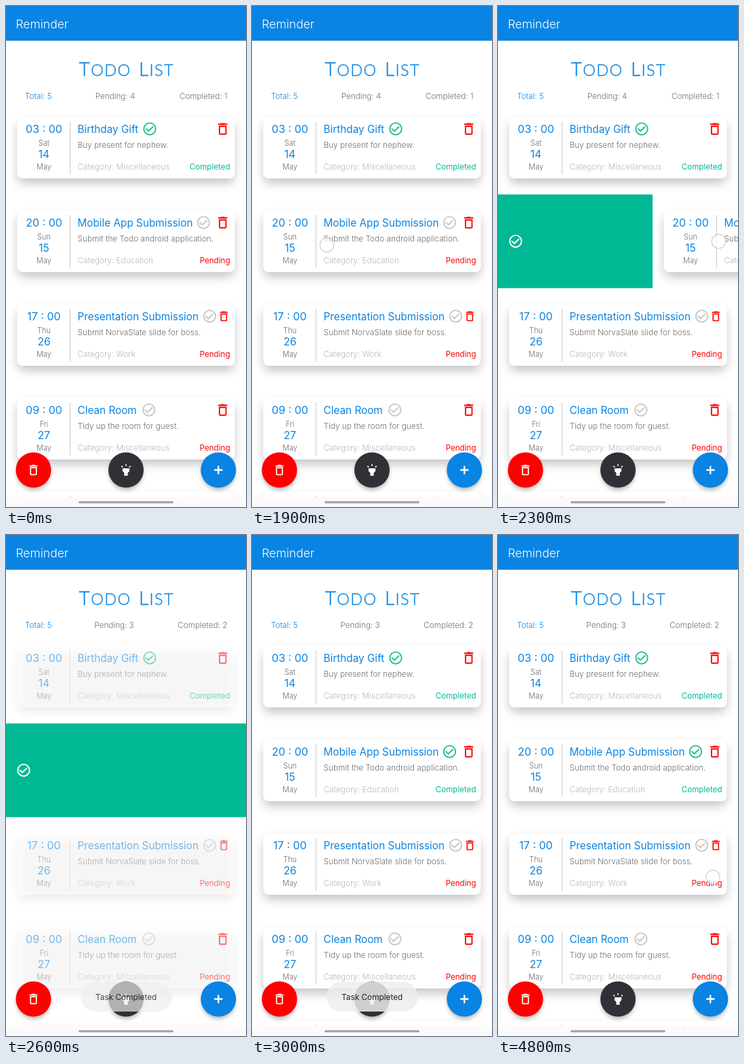
An HTML page for the animation above (4900 ms loop, 354x738 px).

```html
<!DOCTYPE html>
<html lang="en">
<head>
<meta charset="utf-8">
<title>Reminder</title>
<style>
  html, body { margin: 0; width: 100%; height: 100%; overflow: hidden; background: #fff; }
  svg { display: block; width: 100vw; height: 100vh; }
  text { font-family: Inter, Roboto, sans-serif; font-weight: 300; font-size: 11.8px; fill: #6f6f6f; white-space: pre; }
  .mid { text-anchor: middle; }
  .end { text-anchor: end; }
  .blue { fill: #0984e3; }
  .bar { font-size: 17.5px; fill: #fff; }
  .head { font-family: Lato, "Open Sans", sans-serif; font-size: 28px; letter-spacing: 1.4px; fill: #0984e3; stroke: #0984e3; stroke-width: 0.35px; }
  .head .cap { font-size: 23.5px; }
  .stat { font-size: 11.7px; }
  .time { font-size: 16px; font-weight: 400; }
  .day { font-size: 11px; }
  .date { font-size: 15.6px; font-weight: 400; }
  .name { font-size: 15.3px; font-weight: 400; }
  .pale { fill: #b8b8b8; }
  .state { font-size: 11.6px; font-weight: 400; }
  .toast { fill: #222; font-weight: 400; font-size: 11.8px; }
</style>
</head>
<body>
<svg id="stage" viewBox="0 0 354 738" xmlns="http://www.w3.org/2000/svg">
  <defs>
    <filter id="soft" x="-20%" y="-50%" width="140%" height="200%"><feGaussianBlur stdDeviation="7.5"/></filter>
    <filter id="near" x="-30%" y="-30%" width="160%" height="160%"><feGaussianBlur stdDeviation="3"/></filter>
    <path id="trash" fill-rule="evenodd" d="M6 19c0 1.1.9 2 2 2h8c1.1 0 2-.9 2-2V7H6zM8 9h8v10H8zM15.5 4l-1-1h-5l-1 1H5v2h14V4z"/>
    <path id="check" fill-rule="evenodd" d="M16.59 7.58L10 14.17l-3.59-3.58L5 12l5 5 8-8zM12 2C6.48 2 2 6.48 2 12s4.48 10 10 10 10-4.48 10-10S17.52 2 12 2zm0 18c-4.42 0-8-3.58-8-8s3.58-8 8-8 8 3.58 8 8-3.58 8-8 8z"/>
    <path id="torch" d="M6 14l3 3v5h6v-5l3-3V9H6zM11 2h2v3h-2zM3.5 5.88l1.41-1.41 2.12 2.12L5.62 8zM16.96 6.59l2.12-2.12 1.41 1.41L18.38 8z"/>
    <path id="plus" d="M10.7 5h2.6v5.7H19v2.6h-5.7V19h-2.6v-5.7H5v-2.6h5.7z"/>
  </defs>
</svg>
<script>
const LOOP = 4900, STEP = 100, ROW = 138;
const BLUE = '#0984e3', GREEN = '#00b894', RED = '#ff0000', GREY = '#c8c8c8';
const stage = document.getElementById('stage');

function el(tag, attrs, parent = stage, content) {
  const node = document.createElementNS('http://www.w3.org/2000/svg', tag);
  for (const key in attrs) node.setAttribute(key, attrs[key]);
  if (content) node.textContent = content;
  return parent.appendChild(node);
}
const label = (x, y, cls, content, parent) => el('text', { x, y, class: cls }, parent, content);
const set = (node, key, value) => node.setAttribute(key, value);
const show = (node, on) => set(node, 'visibility', on ? 'visible' : 'hidden');
const clamp = v => Math.min(1, Math.max(0, v));
const ramp = (t, from, to) => clamp((t - from) / (to - from));

function icon(id, cx, cy, size, fill, parent) {
  const k = size / 24;
  return el('use', {
    href: '#' + id, fill,
    transform: `translate(${cx - size / 2} ${cy - size / 2}) scale(${k})`
  }, parent);
}

function card(task, index) {
  const root = el('g', {}, list);
  const shadow = el('rect', { x: 17, y: 172, width: 320, height: 89, rx: 9, fill: '#000', filter: 'url(#soft)' }, root);
  const face = el('rect', { x: 16.5, y: 163.5, width: 321, height: 90.5, rx: 8, fill: '#fff' }, root);
  const ink = el('g', {}, root);
  label(56, 186.5, 'mid blue time', task.time, ink);
  label(56, 205.5, 'mid day', task.day, ink);
  label(56, 224.3, 'mid blue date', task.date, ink);
  label(56, 240.5, 'mid day', 'May', ink);
  el('rect', { x: 94, y: 170, width: 1, height: 78, fill: '#ccc' }, ink);
  label(105.5, 186.5, 'blue name', task.name, ink);
  label(105.5, 209, '', task.note, ink);
  label(105.5, 240.7, 'pale', 'Category: ' + task.kind, ink);
  const status = label(330.5, 240.7, 'end state', 'Pending', ink);
  const mark = icon('check', task.mark, 181, 23, GREY, ink);
  icon('trash', task.small ? 321.3 : 319.7, 181, task.small ? 19.5 : 23, RED, ink);

  return {
    update(dx, alpha, done) {
      set(root, 'transform', `translate(${dx} ${index * ROW})`);
      set(shadow, 'opacity', 0.23 * alpha * alpha);
      set(face, 'opacity', alpha);
      set(ink, 'opacity', alpha);
      set(mark, 'fill', done ? '#22bd97' : GREY);
      status.textContent = done ? 'Completed' : 'Pending';
      status.style.fill = done ? GREEN : RED;
    }
  };
}

function fab(cx, fill, id, size) {
  el('circle', { cx, cy: 687.5, r: 25, opacity: 0.3, filter: 'url(#near)' });
  el('circle', { cx, cy: 683.5, r: 26, fill });
  icon(id, cx, 683.5, size, '#fff');
}

// Static page
el('rect', { width: 354, height: 51.2, fill: BLUE });
label(14.5, 32.5, 'bar', 'Reminder');
for (const [x, first, rest] of [[107.5, 'T', 'ODO'], [196, 'L', 'IST']]) {
  const word = label(x, 103, 'head', first);
  el('tspan', { class: 'cap' }, word, rest);
}
label(28, 136.5, 'blue stat', 'Total: 5');
const pending = label(161, 136.5, 'mid stat', 'Pending: 4');
const completed = label(326.5, 136.5, 'end stat', 'Completed: 1');

const list = el('g', {});
const cards = [
  { time: '03 : 00', day: 'Sat', date: '14', name: 'Birthday Gift', note: 'Buy present for nephew.', kind: 'Miscellaneous', mark: 212 },
  { time: '17 : 00', day: 'Thu', date: '26', name: 'Presentation Submission', note: 'Submit NorvaSlate slide for boss.', kind: 'Work', mark: 300.5, small: true, row: 2 },
  { time: '09 : 00', day: 'Fri', date: '27', name: 'Clean Room', note: 'Tidy up the room for guest.', kind: 'Miscellaneous', mark: 210.8, row: 3 },
  { time: '10 : 00', day: 'Sat', date: '28', name: 'Weekly Shopping List', note: 'Buy food for the week.', kind: 'Personal', mark: 274, row: 4 }
].map(task => card(task, task.row || 0));

const reveal = el('g', {}, list);
const band = el('rect', { y: 277.6, height: ROW, fill: GREEN }, reveal);
icon('check', 26, 346.5, 23, '#fff', reveal);
const swiped = card({
  time: '20 : 00', day: 'Sun', date: '15', name: 'Mobile App Submission',
  note: 'Submit the Todo android application.', kind: 'Education', mark: 291.5
}, 1);

el('rect', { y: 724, width: 354, height: 14, fill: '#fafafa' });
el('rect', { x: 107, y: 729.5, width: 140, height: 3, rx: 1.5, fill: '#a0a0a0' });
fab(40.5, RED, 'trash', 20.5);
fab(177, '#303136', 'torch', 20.5);
fab(313.3, BLUE, 'plus', 21);

const toast = el('g', {});
el('rect', { x: 110, y: 658, width: 134.5, height: 44, rx: 22, fill: '#eeeeee', opacity: 0.84 }, toast);
label(177.2, 684.7, 'mid toast', 'Task Completed', toast);

const finger = el('g', {});
el('circle', { r: 10.3, fill: '#fff', 'fill-opacity': 0.72, stroke: '#999', 'stroke-opacity': 0.45, 'stroke-width': 1.2 }, finger);

function render(time) {
  const t = Math.floor((time % LOOP) / STEP) * STEP;
  const drag = Math.pow(ramp(t, 1900, 2300), 1.3);
  const swiping = t > 1900 && t < 2700;
  const counted = t >= 2400;
  const reloaded = t >= 2700;

  const dx = !swiping ? 0 : t < 2400 ? 228 * drag : 380;
  const alpha = reloaded ? ramp(t, 2700, 3000) : 1 - 0.45 * ramp(t, 2400, 2600);
  cards.forEach((c, i) => c.update(0, alpha, i === 0));
  swiped.update(dx, reloaded ? alpha : 1, reloaded);
  show(reveal, swiping);
  set(band, 'width', Math.min(354, dx));

  pending.textContent = counted ? 'Pending: 3' : 'Pending: 4';
  set(pending, 'x', counted ? 159.5 : 161);
  completed.textContent = counted ? 'Completed: 2' : 'Completed: 1';

  const fadeIn = ramp(t, 2400, 2700), fadeOut = ramp(t, 4400, 4700);
  set(toast, 'opacity', Math.sqrt(fadeIn) * (1 - fadeOut));

  const late = t >= 4800;
  show(finger, late || (t >= 1900 && t < 2400));
  const [fx, fy] = late ? [317, 504] : [110.5 + 215 * drag, 352 - 5.3 * drag];
  set(finger, 'transform', `translate(${fx} ${fy})`);
}

const start = performance.now();
function tick() {
  render(performance.now() - start);
  requestAnimationFrame(tick);
}
tick();
</script>
</body>
</html>
```
